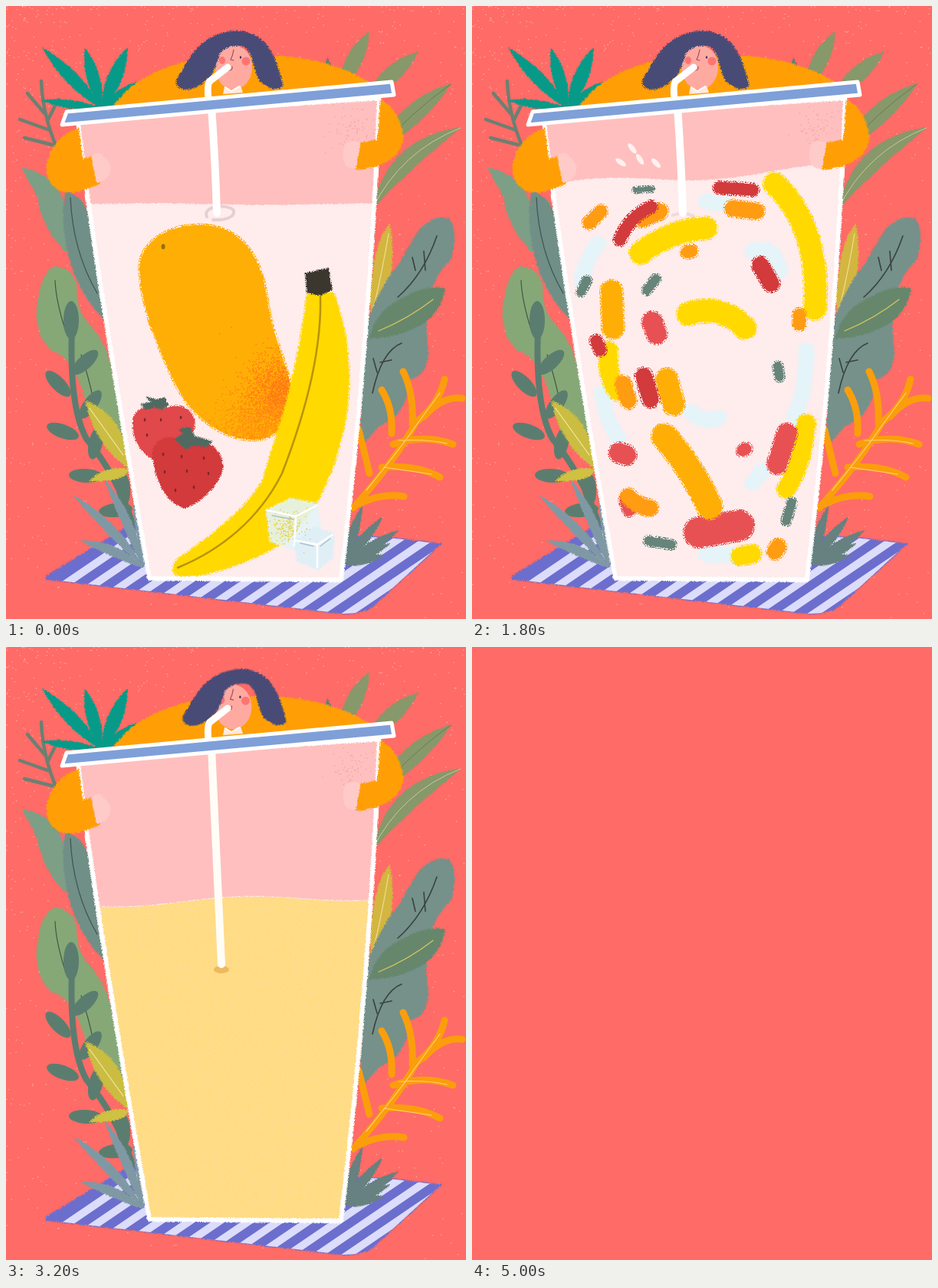
These frames come from a looping animation (600 px wide and 800 px high, 5100 ms). An HTML page with a canvas:

```html
<!DOCTYPE html>
<html lang="en">
<head>
<meta charset="utf-8">
<title>Smoothie</title>
<style>
html, body { margin: 0; width: 100%; height: 100%; overflow: hidden; background: #ff6b66; }
canvas { display: block; }
</style>
</head>
<body>
<canvas id="stage" width="600" height="800"></canvas>
<script>
const LOOP = 5100, STEP = 100, CORAL = '#ff6b66';
const YELLOW = '#ffd900', MANGO = '#ffae05', ORANGE = '#ff9c12', RED = '#e85153', CRIMSON = '#d23a3c';
const LEAF = '#67847a', ICE = '#e4f4f9', TAN = '#f4ac25', ROSE = '#ee999f';
const stage = document.getElementById('stage').getContext('2d');
let g = stage, seed = 7;

const random = () => (seed = (seed * 16807) % 2147483647) / 2147483647;
const clamp = v => Math.max(0, Math.min(1, v));
const lerp = (a, b, p) => a + (b - a) * p;

// Piecewise linear value through [time, value] pairs.
function track(t, keys) {
  let i = 1;
  while (i < keys.length - 1 && t > keys[i][0]) i++;
  const [a, u] = keys[i - 1], [b, v] = keys[i];
  return lerp(u, v, clamp((t - a) / (b - a)));
}

// Blends two paths that share the same commands.
function morph(from, to, p) {
  const goals = to.match(/\d+/g);
  let i = 0;
  return from.replace(/\d+/g, n => lerp(+n, +goals[i++], p));
}

// Chalky fill: a tile of randomly placed grains.
const tiles = {};
function chalk(color, density) {
  const key = color + density;
  if (tiles[key]) return tiles[key];
  const tile = document.createElement('canvas'), c = tile.getContext('2d');
  tile.width = tile.height = 96;
  c.fillStyle = color;
  for (let x = 0; x < 96; x++)
    for (let y = 0; y < 96; y++)
      if (random() < density) c.fillRect(x, y, 1, 1);
  return tiles[key] = c.createPattern(tile, 'repeat');
}

function shape(d, color, rough = 3) {
  const p = d instanceof Path2D ? d : new Path2D(d);
  g.fillStyle = color;
  g.fill(p);
  if (rough) line(p, chalk(color, 0.5), rough);
}
function line(d, color, width) {
  g.lineCap = g.lineJoin = 'round';
  g.strokeStyle = color;
  g.lineWidth = width;
  g.stroke(d instanceof Path2D ? d : new Path2D(d));
}
// Thick dab of paint with a grainy rim.
function dab(color, width, d) {
  line(d, chalk(color, 0.5), width + 3);
  line(d, color, width - 2);
}
// Dry brush: grains thin out towards the rim.
function softDab(color, width, d, density = 0.7) {
  line(d, chalk(color, density * 0.35), width + 8);
  line(d, chalk(color, density * 0.6), width);
  line(d, chalk(color, density * 0.9), width * 0.8);
}
function oval(x, y, rx, ry, color, turn = 0) {
  g.fillStyle = color;
  g.beginPath();
  g.ellipse(x, y, rx, ry, turn, 0, 7);
  g.fill();
}
function leaf(x1, y1, x2, y2, w, color, bend = 0, vein) {
  const mx = (x1 + x2) / 2, my = (y1 + y2) / 2, len = Math.hypot(x2 - x1, y2 - y1);
  const nx = (y1 - y2) / len * 2, ny = (x2 - x1) / len * 2;
  const side = k => `Q${mx + nx * k} ${my + ny * k} `;
  shape(`M${x1} ${y1}${side(bend + w)}${x2} ${y2}${side(bend - w)}${x1} ${y1}Z`, color, 2);
  if (vein) line(`M${x1} ${y1}${side(bend)}${x2} ${y2}`, vein, 1);
}
function spray(x, y, r, n, color) {
  g.fillStyle = color;
  for (let i = 0; i < n; i++) {
    const a = random() * 6.283, d = r * Math.sqrt(-2 * Math.log(random() + 1e-6));
    g.fillRect(x + Math.cos(a) * d, y + Math.sin(a) * d, 1.4, 1.4);
  }
}

function drawMat() {
  const mat = new Path2D('M53 744L148 686Q170 670 190 684L500 694L567 702L482 780Q470 793 440 793Q240 770 53 748Z');
  shape(mat, '#6c6ecd');
  g.save();
  g.clip(mat);
  for (let i = 0; i < 13; i++) {
    const x = 66 + i * 34, y = 762 + i * 3.2;
    line(`M${x} ${y}L${x + 150} ${y - 102}`, '#dcdcfb', 10);
  }
  g.restore();
}

function drawLeftPlants() {
  line('M74 202Q48 150 46 98M57 162L18 148M64 182L24 172M50 140L28 114M54 150L68 122', '#6c8072', 4.5);
  for (const [x, y, w] of [[48, 55, 8], [47, 123, 5], [103, 55, 8], [158, 55, 9], [170, 100, 6]])
    leaf(125, 134, x, y, w, '#079a88');
  shape('M22 212Q65 222 74 255Q84 290 78 320Q48 290 42 250Z', '#7c9f86');
  shape('M78 243Q105 250 110 285L130 410Q90 370 80 315Q72 275 78 243Z', '#708f87');
  line('M84 250Q87 320 119 375', '#3f5350', 1.2);
  shape('M65 340Q94 345 92 380Q95 405 112 420Q142 450 153 575Q115 550 100 500Q85 455 60 450Q39 430 41 395Q45 347 65 340Z', '#86a877');
  line('M64 358Q65 385 78 425M98 455Q108 485 113 510', '#405848', 1.2);
  const green = '#5b7d70';
  line('M165 675Q143 610 105 565Q80 520 87 400', green, 8);
  oval(85, 410, 10, 25, green);
  const leaves = [[68, 493, 0.8], [103, 465, 2.4], [74, 555, 0.35], [110, 520, 2.2], [104, 613, 0.05],
    [117, 570, 1.8], [143, 658, -0.1], [153, 630, 1.5]];
  for (const [x, y, turn] of leaves) oval(x, y, 22, 9, green, turn);
  shape('M104 516Q155 535 160 603Q118 575 104 516Z', '#cbbd41');
  line('M109 525L153 586', '#f3e7a5', 1.2);
  shape('M110 620Q128 600 161 605Q153 620 110 620Z', '#cfc142');
  for (const [x, y] of [[89, 640], [129, 619], [166, 645], [98, 698]])
    leaf(179, 733, x, y, 6, '#7f99a4', 4);
}

function drawRightPlants() {
  const olive = '#87986a';
  leaf(425, 105, 419, 68, 4, '#67806d');
  leaf(435, 108, 473, 34, 10, olive);
  leaf(470, 118, 537, 60, 10, olive);
  leaf(484, 190, 580, 102, 12, olive, -4, '#6b7b55');
  leaf(478, 264, 593, 159, 12, olive, -15, '#c8ca99');
  shape('M476 412Q474 320 500 285Q509 330 495 385Z', '#d3b640');
  line('M499 297Q492 340 480 392', '#efdd92', 1.2);
  shape('M468 425Q485 370 511 340Q520 325 534 300Q553 272 578 278Q590 295 580 330Q555 355 549 390Q546 425 550 452Q550 480 526 487Q522 535 487 547L462 575Z', '#75918a');
  line('M562 300Q545 350 511 380M545 320L547 345M534 345L530 328M516 440Q490 450 478 505M488 465L503 462M484 478L479 460', '#39423f', 1.6);
  shape('M475 433Q482 398 520 380Q550 364 572 369Q567 402 535 419Q505 433 475 433Z', '#66876c');
  line('M486 424Q525 408 557 383', '#dbc65f', 1.2);
  line('M453 655Q510 590 535 543Q565 520 572 487M518 477Q532 505 530 545M490 501Q505 525 503 558M595 512Q570 508 545 536M583 572Q545 558 505 572M566 615Q535 598 490 602M519 640Q490 635 460 650M460 553Q468 585 474 610', '#fb9e0b', 9);
  line('M470 632Q520 570 533 550L566 505M512 567Q550 565 575 571M493 602L555 611', '#ffd27b', 1.2);
  for (const [x, y] of [[464, 654], [490, 668], [511, 685], [500, 702], [492, 717]])
    leaf(440, 728, x, y, 6, '#66817f');
}

function drawHead(lift) {
  g.save();
  g.translate(-lift, -3 * lift);
  oval(297, 80, 24, 29, '#ffaaa1');
  oval(313, 72, 5.5, 5.5, '#ff7472');
  oval(282, 71, 4, 5, '#ff7472');
  oval(306, 67, 1.2, 1.8, '#39375e');
  line('M297 57Q296 64 293 70L297 71M291 84Q296 84 295 79', '#a34d57', 1.2);
  g.restore();
  shape('M285 105L295 111L306 104L309 113L283 115Z', '#ffe9df', 0);
  line('M286 106L294 111L304 105', '#fff', 2);
  g.save();
  g.translate(361 + 7 * lift, 33 - 6 * lift);
  g.scale(1 - 0.05 * lift, 1 - 0.06 * lift);
  g.translate(-361, -33);
  shape('M223 97C240 68 252 38 296 33C338 31 352 65 361 104C352 112 341 106 332 98C322 85 326 66 312 53C300 50 287 51 278 62C275 80 262 103 240 108C229 110 221 105 223 97Z', '#494b77');
  g.restore();
  line('M289 80L266 98Q262 102 264 121', '#fff', 9);
}

const cup = new Path2D('M93 146Q117 350 187 747L437 749Q475 430 487 120Z');

function drawMango(p) {
  const body = new Path2D(morph(
    'M175 350C170 310 210 285 255 286C310 288 333 330 340 380C346 430 365 460 372 500C376 535 355 567 322 566C285 565 240 540 215 480C195 435 178 395 175 350Z',
    'M148 375C148 320 185 283 238 282C295 284 332 320 338 375C344 425 345 440 360 466C362 485 345 542 310 542C272 538 245 515 210 492C170 465 148 425 148 375Z', p));
  shape(body, MANGO, 5);
  g.save();
  g.clip(body);
  spray(lerp(360, 345, p), lerp(505, 488, p), 24, 2600, '#ff7a17');
  spray(lerp(325, 305, p), lerp(555, 520, p), 26, 1600, '#ff8f10');
  g.restore();
  oval(lerp(205, 197, p), lerp(314, 308, p), 2.5, 3.5, '#94700b');
}

function drawBanana(p, label) {
  shape(morph(
    'M393 376L427 374C445 420 452 480 444 530C430 620 390 690 340 712C300 732 250 748 224 743C216 738 216 730 224 722C270 690 310 660 335 620C350 565 378 500 393 376Z',
    'M386 345L420 342C440 385 446 450 440 530C430 600 385 670 335 698C300 715 245 730 214 729C204 726 204 716 212 710C260 690 305 655 335 610C372 550 388 480 386 345Z', p), YELLOW, 4);
  line(morph('M410 376C412 440 395 520 360 610C330 670 280 710 224 733',
    'M406 345C412 420 400 500 360 590C325 650 270 700 212 716', p), '#b8920b', 2.5);
  shape(morph('M391 349L420 343L425 370L410 377L393 374Z',
    'M382 312L404 307L417 320L414 343L388 343Z', p), '#3b362e');
  if (!label) return;
  g.save();
  g.translate(391, 575);
  g.rotate(-0.96);
  g.fillStyle = '#6b5508';
  g.font = 'italic 14px Lato, sans-serif';
  g.letterSpacing = '3px';
  g.textAlign = 'center';
  g.fillText('“BANANA”', 0, 4);
  g.restore();
}

function drawBerries(p) {
  shape(morph('M166 545C165 520 198 519 205 526C230 515 250 530 245 552C235 580 200 598 190 590C172 580 165 560 166 545Z',
    'M179 548C180 524 205 520 215 525C240 520 255 535 252 555C245 580 225 610 205 606C188 590 178 568 179 548Z', p), '#e0484b');
  shape(morph('M192 590C188 565 215 558 230 568C260 560 285 580 282 605C275 630 250 650 232 655C205 645 195 615 192 590Z',
    'M208 590C212 565 235 560 250 570C275 562 290 582 284 605C278 630 255 667 228 666C212 650 205 615 208 590Z', p), CRIMSON);
  g.save();
  g.translate(11 * p, 4 * p);
  shape('M177 520L190 517L184 511L197 514L207 512L211 521L204 526L193 523L182 526Z', '#506a61');
  shape('M221 565L232 559L226 552L240 550L246 562L268 568L262 575L245 573L234 578Z', '#506a61');
  for (const [x, y] of [[181, 540], [202, 540], [184, 560], [228, 537], [205, 585], [229, 588], [258, 590], [207, 608], [236, 607], [264, 610], [221, 632], [245, 628]])
    oval(x, y, 1.3, 2.2, '#80252d');
  g.restore();
}

function drawIce(p) {
  g.globalAlpha = 0.88;
  shape('M340 658L372 643L405 650L410 681L376 709L345 698Z', ICE, 4);
  shape('M376 699L402 681L427 689L426 720L407 735L380 724Z', '#dcf0f7', 4);
  g.globalAlpha = 1;
  spray(368, 682, 11, 160 * (1 - p), '#e5cf40');
  line('M340 658L378 666L405 652M378 666L376 704M376 697L406 703L426 690M406 703L406 733', '#fff', 2.5);
  line('M347 665L375 670M410 705L423 695M384 701L401 705', '#aebfca', 1.5);
}

function rock(x, y, turn, draw) {
  g.save();
  g.translate(x, y);
  g.rotate(turn);
  g.translate(-x, -y);
  draw();
  g.restore();
}

function drawFruit(t) {
  const u = clamp(t / 1200), p = u * u * (3 - 2 * u), bob = Math.sin(u * 6.283);
  rock(265, 420, bob * 0.04, () => {
    drawMango(p);
    if (t >= 700) line('M182 373Q230 381 280 368', chalk('#9a6b0a', 0.22), 1.5);
  });
  rock(330, 540, -bob * 0.03, () => drawBanana(p, t >= 700));
  rock(225, 585, bob * 0.05, () => drawBerries(p));
  rock(384, 690, bob * 0.05, () => drawIce(p));
}

function drawPieces() {
  dab(ICE, 20, 'M165 310Q148 330 143 360M305 255L330 258M365 320Q395 310 402 345M436 450Q435 510 420 535M170 505Q175 545 192 565M285 530Q300 545 322 537M380 605L366 622M305 715L345 718');
  dab(YELLOW, 30, 'M395 232Q455 290 447 395M220 322Q260 292 305 290M282 402Q325 388 356 420');
  dab(YELLOW, 25, 'M178 450Q176 485 190 503M436 545Q430 600 410 630M350 718L365 715');
  dab(RED, 40, 'M296 687L348 678');
  dab(RED, 27, 'M411 558L398 598M235 412L241 428M192 583L201 586');
  dab(RED, 17, 'M353 580L357 578M200 645L205 658');
  dab(MANGO, 34, 'M251 562Q285 600 310 653');
  dab(MANGO, 29, 'M182 372L184 420M254 487L263 520');
  dab(ORANGE, 22, 'M340 264L371 268M222 278L245 268M204 640Q215 653 232 655M197 493L204 515M395 712L399 706');
  dab(ORANGE, 18, 'M153 283L168 268M281 321L286 320M427 403L427 415');
  dab(CRIMSON, 17, 'M193 305Q205 275 234 262M323 237L366 240M162 437L167 449');
  dab(CRIMSON, 23, 'M376 338L390 362M224 483L233 513');
  dab(LEAF, 13, 'M142 373L150 358M228 371L240 356M399 470L401 484M230 698L260 703M417 648L410 672');
  dab(LEAF, 8, 'M213 240L234 239');
}

function drawBlur() {
  softDab(YELLOW, 60, 'M300 258Q370 245 440 260', 0.8);
  softDab(YELLOW, 42, 'M156 320Q158 400 152 470M365 370Q410 400 430 460');
  softDab(YELLOW, 50, 'M435 490Q450 560 400 625M205 480Q210 540 235 575M215 692Q260 740 310 735', 0.75);
  softDab(TAN, 48, 'M200 340Q225 305 255 288M320 690Q370 690 405 655', 0.75);
  softDab(TAN, 32, 'M165 290L185 270M390 325L412 342M285 615L350 622M183 612Q195 635 217 655', 0.55);
  softDab(TAN, 13, 'M197 420Q208 385 230 362M340 322L355 320M380 455Q395 480 390 515M395 732L415 718M305 470Q320 505 348 497', 0.75);
  softDab(ROSE, 17, 'M255 385Q300 345 360 365M245 450Q255 530 320 550M200 580Q215 615 260 628');
  softDab(ROSE, 22, 'M418 527L428 505');
  softDab(ROSE, 8, 'M437 375Q440 400 450 425', 0.45);
  softDab(TAN, 5, 'M125 258L160 250', 0.3);
}

// Turns the contents along an upright elliptical orbit.
function swirl(turn, draw) {
  g.save();
  g.translate(298, 490);
  g.scale(1, 1.45);
  g.rotate(turn);
  g.scale(1, 1 / 1.45);
  g.translate(-298, -490);
  draw();
  g.restore();
}

function drawSplash(t) {
  const drops = t < 700 || t > 2600 ? [] :
    t < 1500 ? [[180, 195, 1.4], [375, 179, 2]] :
    t < 2100 ? [[194, 204, 0.6], [209, 186, 0.9], [219, 200, 1], [240, 205, 0.8]] :
    [[203, 178, 0.4], [208, 206, 0.1], [239, 199, 0.5]];
  const size = t < 2100 ? 8 : 6;
  for (const [x, y, turn] of drops) oval(x, y, size, 3.4, '#fff1ef', turn);
}

function drawDrink(t) {
  const level = track(t, [[0, 259], [1200, 216], [1800, 223], [2400, 205], [2800, 218], [3200, 331], [3600, 470], [4200, 764]]);
  const tilt = track(t, [[0, 0], [1200, -14], [1800, -12], [2400, -12], [3200, -5], [4200, 0]]);
  const wave = track(t, [[0, 1], [1200, 5], [2400, 6], [4200, 3]]);
  const mix = clamp((t - 2400) / 500);
  const top = new Path2D();
  top.moveTo(80, 800);
  for (let x = 80; x <= 500; x += 10)
    top.lineTo(x, level + tilt * (x - 290) / 190 + wave * Math.sin(x / 48 - t / 150 + 7.06));
  top.lineTo(500, 800);
  g.save();
  g.clip(cup);
  shape(cup, '#ffbfbf', 0);
  spray(450, 160, 16, 70, '#f4a3a5');
  drawSplash(t);
  shape(top, '#ffecec', 2);
  g.clip(top);
  if (t <= 1400) swirl(Math.max(0, t - 1200) * 0.002, () => drawFruit(t));
  else if (t <= 2000) swirl((t - 1800) * 0.0035, drawPieces);
  else if (t < 2900) swirl((t - 2400) * 0.0035, drawBlur);
  if (mix) {
    g.globalAlpha = mix;
    shape(top, '#ffdb83', 0);
    g.globalAlpha = mix * 0.25;
    shape(top, chalk('#ffe6c2', 0.16), 0);
    g.globalAlpha = 1;
  }
  g.restore();
  const end = track(t, [[0, 273], [2500, 273], [3200, 417], [3600, 550], [4000, 728], [4200, 740]]);
  const tip = track(end, [[273, 275], [417, 281], [740, 309]]);
  if (t < 2300) {
    g.globalAlpha = t < 1300 ? 1 : 0.6;
    line(t < 1300 ? 'M262 275C255 260 292 258 297 267C299 276 285 280 270 279' : 'M262 273Q275 268 289 274', '#e6cfd2', 4);
    if (t >= 900 && t < 1300) line('M164 274Q164 285 176 286M354 257Q361 266 355 276M302 263Q308 273 300 277', '#eadade', 3);
    g.globalAlpha = 1;
  } else if (t >= 2800 && t < 4000) oval(tip, end + 4, 10, 5, '#eeb95f');
  const bend = 273 + (tip - 275) * 0.35;
  line(`M268 132Q${bend} ${(132 + end) / 2} ${tip} ${end - 3}`, t > 3100 ? '#fffdf6' : '#fff', 10);
}

function drawCupFront() {
  line(cup, '#fff', 5);
  line(cup, chalk('#ffffff', 0.5), 7);
  const sleeve = '#ff9f05', skin = '#ffcbc8';
  shape('M94 160Q60 172 53 210Q54 242 85 243Q103 241 122 231L113 197L100 200Z', sleeve);
  shape('M489 122Q515 140 518 172Q513 208 457 213L462 179L485 175Z', sleeve);
  shape('M112 196Q123 188 127 197Q139 207 135 218Q130 229 118 230Z', skin, 2);
  shape('M462 178Q447 174 442 182Q437 194 443 207Q450 213 456 211Z', skin, 2);
  shape('M79 138L503 99L506 116L73 155Z', '#7f9fd8', 0);
  line('M79 138L503 99L506 116L73 155Z', '#fff', 5);
}

function drawBackdrop() {
  g.fillStyle = CORAL;
  g.fillRect(0, 0, 600, 800);
  g.globalAlpha = 0.55;
  g.fillStyle = '#ffe2dc';
  for (let i = 0; i < 900; i++)
    g.fillRect(600 * random() ** 1.3, 800 * random() ** 1.7, 1.3, 1.3);
  g.globalAlpha = 1;
  drawMat();
  drawLeftPlants();
  drawRightPlants();
  shape('M138 135Q170 85 250 70Q300 62 370 67Q440 75 482 106L480 130Z', '#ff9f05');
}

const backdrop = document.createElement('canvas');
backdrop.width = 600;
backdrop.height = 800;
g = backdrop.getContext('2d');
drawBackdrop();
g = stage;

function drawScene(t) {
  seed = 91;
  g.drawImage(backdrop, 0, 0);
  drawHead(track(t, [[2400, 0], [3200, 0.6], [4200, 1]]));
  drawDrink(t);
  drawCupFront();
  if (t >= 4500) {
    g.globalAlpha = (t - 4400) / 600;
    g.fillStyle = CORAL;
    g.fillRect(0, 0, 600, 800);
    g.globalAlpha = 1;
  }
}

const start = performance.now();
let shown = -1;
function tick() {
  const t = Math.floor((performance.now() - start) % LOOP / STEP) * STEP;
  if (t !== shown) drawScene(shown = t);
  requestAnimationFrame(tick);
}
tick();
</script>
</body>
</html>
```
